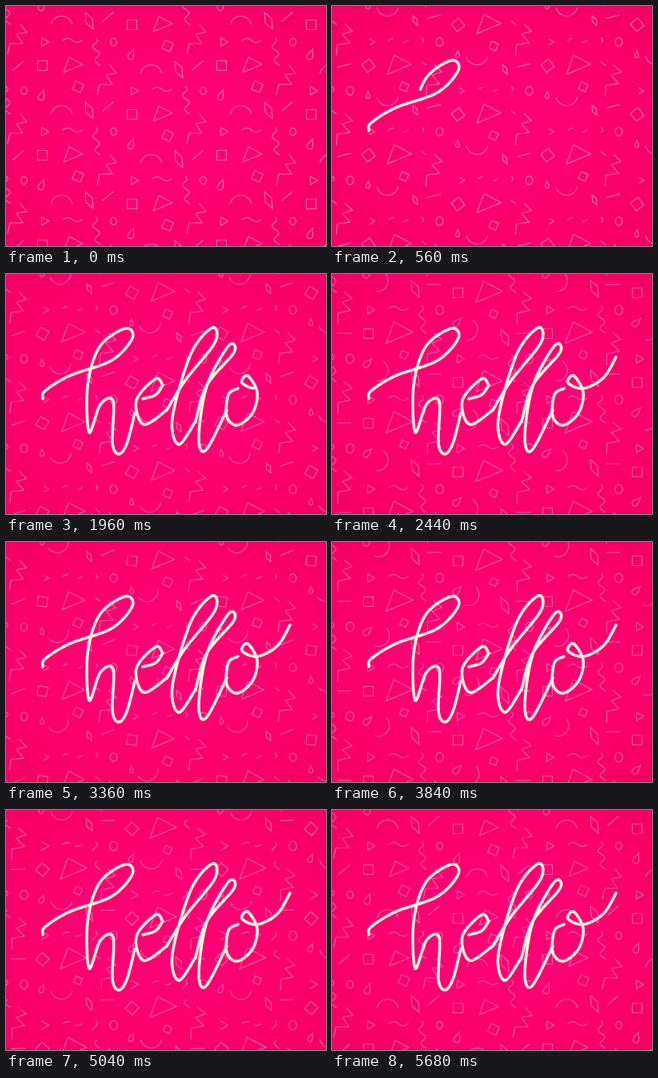
These frames come from a looping animation (400 px wide and 300 px high, 5760 ms). An HTML page with a canvas:

```html
<!DOCTYPE html>
<html lang="en">
<head>
<meta charset="utf-8">
<title>hello</title>
<style>
html, body { margin: 0; width: 100%; height: 100%; overflow: hidden; background: #ff0073; }
canvas { display: block; }
</style>
</head>
<body>
<canvas id="stage" width="400" height="300"></canvas>
<script>
const ctx = document.getElementById('stage').getContext('2d');
const LOOP = 5760, BEAT = LOOP / 4, COLUMN = 112, STAGGER = 51;
const { sin, cos, PI } = Math;

const ramp = (v, from, to) => Math.max(0, Math.min(1, (v - from) / (to - from)));
const ease = v => v * v * (3 - 2 * v);
const rise = (v, from, to) => ease(ramp(v, from, to));
const mix = (a, b, k) => a + (b - a) * k;

// Motions over one beat, with phase p from 0 to 1.
const spin = p => rise(p, 0, .65);
const swell = p => rise(p, .15, .55) - rise(p, .68, .95);
const swing = p => rise(p, .1, .4) - rise(p, .5, .95);
const blink = p => rise(p, .12, .32) - rise(p, .4, .62);

const plot = (n, f) => Array.from({ length: n + 1 }, (_, i) => f(i / n));
const polygon = (n, r, turn) => plot(n, u => [r * cos(u * 2 * PI + turn), r * sin(u * 2 * PI + turn)]);
const toPoints = text => text.trim().split(/\s+/).map(p => p.split(',').map(Number));

// Catmull-Rom curve through the points, sampled finely.
function smooth(points) {
  const at = i => points[Math.max(0, Math.min(points.length - 1, i))];
  return plot((points.length - 1) * 16, v => {
    const pos = v * (points.length - 1), i = Math.floor(pos), u = pos - i;
    const [a, b, c, d] = [at(i - 1), at(i), at(i + 1), at(i + 2)];
    return [0, 1].map(k => b[k] + u / 2 * (c[k] - a[k]
      + u * (2 * a[k] - 5 * b[k] + 4 * c[k] - d[k]
      + u * (3 * (b[k] - c[k]) + d[k] - a[k]))));
  });
}

function lengths(points) {
  let sum = 0;
  return points.map((p, i) => sum += i ? Math.hypot(p[0] - points[i - 1][0], p[1] - points[i - 1][1]) : 0);
}

function trace(points) {
  const path = new Path2D();
  points.forEach(([x, y]) => path.lineTo(x, y));
  return path;
}

const zero = () => 0, one = () => 1;

// An outline around its pivot, with turn in degrees, size and visible share by phase.
function shape(x, y, points, { turn = zero, size = one, show = one } = {}) {
  return { x, y, turn, size, show, path: trace(points), length: lengths(points).pop() };
}

const confetti = [
  shape(45.5, 74.5, polygon(4, 8.5, PI / 4), { turn: p => 360 * spin(p) }),
  shape(83, 74, toPoints('-4,-10 13,-1 -11,9 -4,-10'), { size: p => 1 + .4 * swell(p) }),
  shape(90, 101, polygon(4, 7.8, 1.2), { size: p => 1 - .25 * swell(p) }),
  shape(47.5, 45, polygon(3, 6, 0), { show: p => 1 - .55 * blink(p) }),
  shape(83, 43, plot(24, u => [24 * u - 12, 2.5 * sin(2 * PI * u - PI)]), { show: p => 1 - .55 * blink(p) }),
  shape(113, 57, plot(34, u => {
    const y = 34 * u - 17;
    return [.15 * y + 3.5 * sin(.37 * y + .6), y];
  }), { show: p => 1 - .7 * blink(p) }),
  shape(45, 111, plot(30, u => [5.5 * sin(2 * PI * u) * sin(PI * u) ** 2, -7 * cos(2 * PI * u)]),
    { turn: p => 20 + 25 * swell(p) - 35 * blink(p), size: p => 1 - .35 * blink(p) }),
  shape(104, 130, toPoints('-5,-10 4,-2 5,11 -4,3 -5,-10'), { size: p => 1 - .4 * blink(p) }),
  shape(128, 125, toPoints('-7,6 6,-5'), { turn: p => 40 * swell(p) }),
  shape(127, 87, toPoints('3,-13 11,-3 -2,-1 6,11 -10,11 -13,24'), { turn: p => -12 * swell(p) }),
  shape(134.5, 45, plot(24, u => [3.8 * cos(2 * PI * u), 4.6 * sin(2 * PI * u)]), { size: p => 1 + .25 * swell(p) }),
  shape(69.5, 124.5, plot(24, u => [-13.5 * cos(PI * mix(.08, .92, u)), 13.5 - 13.5 * sin(PI * mix(.08, .92, u))]),
    { turn: p => 180 * swing(p) })
];

function stroke(from, to, text) {
  const points = smooth(toPoints(text));
  return { points, reach: lengths(points), from, to };
}

// Key points the pen passes through, letter by letter.
const letters = [
  stroke(160, 1040, `46,156 49,146 80,127 132,108 158,80 149,68 117,91 102,140
    104,198 118,163 134,159 133,211 141,225 151,212 161,174`),
  stroke(760, 1080, '196,139 187,131 163,158 172,188 201,170'),
  stroke(1080, 1300, '171,156 187,151 196,139'),
  stroke(1120, 1600, '201,170 224,133 261,86 258,67 231,100 208,180 216,213 237,184'),
  stroke(1340, 1780, '237,184 251,139 285,98 278,90 251,140 241,204 250,220 276,170'),
  stroke(1560, 2175, `290,143 278,151 276,178 289,189 308,174 314,148 302,127 295,136
    314,143 339,130 355,104`)
];

function drawStroke({ points, reach, from, to }, t) {
  const done = rise(t, from, to) * reach[reach.length - 1];
  if (!done) return;
  const n = reach.findIndex(r => r >= done);
  const [a, b] = [points[n - 1], points[n]];
  const k = (done - reach[n - 1]) / (reach[n] - reach[n - 1]);
  ctx.stroke(trace([...points.slice(0, n), [mix(a[0], b[0], k), mix(a[1], b[1], k)]]));
}

function drawConfetti(t) {
  const p = t % BEAT / BEAT;
  ctx.strokeStyle = `rgba(255,255,255,${mix(.4, .34, ramp(t, 1100, 1900))})`;
  for (const s of confetti) {
    const turn = s.turn(p) * PI / 180, size = s.size(p), show = s.show(p);
    const part = s.length * show / 2;
    ctx.lineWidth = 1.2 / size;
    ctx.setLineDash(show < .999 ? [part, s.length - 2 * part, part, s.length] : []);
    for (let col = -2; col < 4; col++) {
      for (let row = -2; row < 4; row++) {
        ctx.save();
        ctx.translate(s.x + col * COLUMN, s.y + row * COLUMN - (col & 1) * STAGGER);
        ctx.rotate(turn);
        ctx.scale(size, size);
        ctx.stroke(s.path);
        ctx.restore();
      }
    }
  }
  ctx.setLineDash([]);
}

function dot(x, y, r) {
  ctx.beginPath();
  ctx.arc(x, y, r, 0, 7);
  ctx.fill();
}

// A ball drops with thin speed lines where the tall letters appear.
function drawDrop(t) {
  if (t < 840 || t > 1240) return;
  const y = 146 + .44 * (t - 1080);
  ctx.lineWidth = 1;
  for (const [x, top, bottom] of [[238, 86, 8], [241, 74, 12], [244, 108, 16]]) {
    ctx.stroke(trace([[x, y - top], [x, y - bottom]]));
  }
  dot(241, y, 3.5);
  if (t > 1000) dot(208, 205, 1.6);
}

const glow = ctx.createRadialGradient(0, 0, 90, 0, 0, 270);
glow.addColorStop(0, '#ff0073');
glow.addColorStop(1, '#f60064');

function drawBackdrop() {
  ctx.save();
  ctx.translate(200, 150);
  ctx.scale(1, .75);
  ctx.fillStyle = glow;
  ctx.fillRect(-200, -200, 400, 400);
  ctx.restore();
}

function draw(t) {
  drawBackdrop();
  drawConfetti(t);
  ctx.strokeStyle = ctx.fillStyle = '#fff3df';
  drawDrop(t);
  ctx.lineWidth = 3.6;
  letters.forEach(s => drawStroke(s, t));
}

ctx.lineCap = ctx.lineJoin = 'round';
const start = performance.now();
function frame() {
  draw((performance.now() - start) % LOOP);
  requestAnimationFrame(frame);
}
frame();
</script>
</body>
</html>
```
